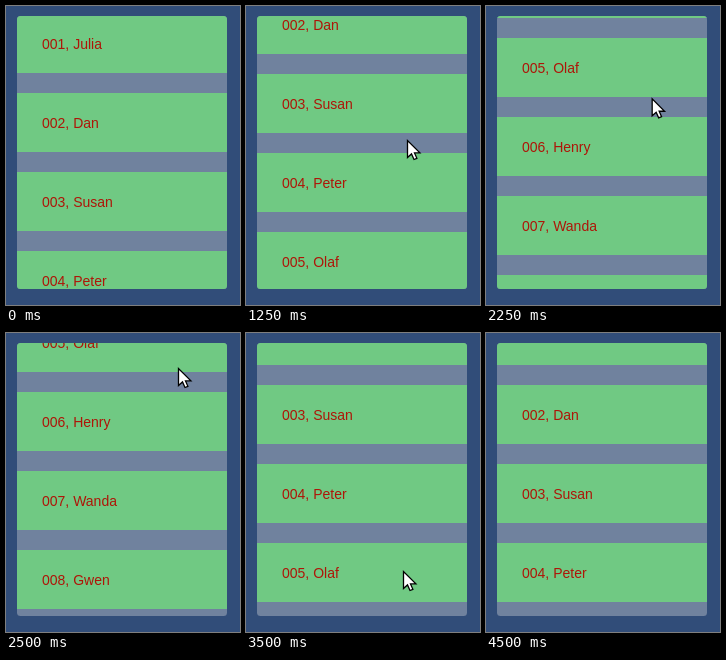
These frames come from a looping animation (234 px wide and 299 px high, 4.75 s). An HTML page with a canvas:

```html
<!DOCTYPE html>
<html lang="en">
<head>
<meta charset="utf-8">
<title>Scrolling list</title>
<style>
html, body { margin: 0; width: 100%; height: 100%; overflow: hidden; background: #314d79; }
canvas { display: block; width: 234px; height: 299px; }
</style>
</head>
<body>
<canvas id="stage" width="234" height="299"></canvas>
<script>
const ctx = document.getElementById('stage').getContext('2d');
const names = ['Julia', 'Dan', 'Susan', 'Peter', 'Olaf', 'Henry', 'Wanda', 'Gwen'];

const STEP = 250;
const LOOP = 4750;
const VIEW = { x: 11, y: 10, w: 210, h: 273 };
const ITEM = { top: 8, height: 59, pitch: 79 };

const linear = p => p;
const accelerate = p => p * p;
const coast = p => 1 - (1 - p) ** 3.5;

// Drag up twice, drag back down, then coast to rest.
const scrollPath = [
  { t: 750, y: 0 },
  { t: 1250, y: 98 },
  { t: 1750, y: 187 },
  { t: 2500, y: 344 },
  { t: 2750, y: 351 },
  { t: 3500, y: 114 },
  { t: 4500, y: 35, ease: coast }
];

const pointerPath = [
  { t: 250, x: 171, y: 232 },
  { t: 750, x: 168, y: 243 },
  { t: 1250, x: 161, y: 134 },
  { t: 1750, x: 153, y: 207 },
  { t: 2500, x: 172, y: 35 },
  { t: 3500, x: 157, y: 238, ease: accelerate },
  { t: 4000, x: 167, y: 205 }
];

function follow(path, time, axis) {
  const next = path.findIndex(point => point.t >= time);
  if (next <= 0) return path.at(next)[axis];
  const a = path[next - 1], b = path[next];
  const ease = b.ease ?? linear;
  return a[axis] + (b[axis] - a[axis]) * ease((time - a.t) / (b.t - a.t));
}

function drawList(scroll) {
  ctx.save();
  ctx.beginPath();
  ctx.roundRect(VIEW.x, VIEW.y, VIEW.w, VIEW.h, 3.5);
  ctx.clip();
  ctx.fillStyle = '#70829e';
  ctx.fillRect(VIEW.x, VIEW.y, VIEW.w, VIEW.h);
  ctx.font = '14px "Liberation Sans", Arial, sans-serif';
  names.forEach((name, i) => {
    const y = ITEM.top + i * ITEM.pitch - scroll;
    ctx.fillStyle = '#70c983';
    ctx.fillRect(VIEW.x, y, VIEW.w, ITEM.height);
    ctx.fillStyle = '#ae1508';
    ctx.fillText(`${String(i + 1).padStart(3, '0')}, ${name}`, 36, y + 35);
  });
  ctx.restore();
}

function drawPointer(x, y) {
  const outline = [[0, 0], [0, 17], [4, 13.4], [6.5, 19], [9.4, 17.8], [7, 12.4], [12.4, 12.4]];
  ctx.save();
  ctx.translate(x + 0.5, y + 0.5);
  ctx.beginPath();
  outline.forEach(([px, py]) => ctx.lineTo(px, py));
  ctx.closePath();
  ctx.fillStyle = '#fff';
  ctx.fill();
  ctx.strokeStyle = '#000';
  ctx.lineWidth = 1.3;
  ctx.stroke();
  ctx.restore();
}

function draw(now) {
  const time = Math.floor(now % LOOP / STEP) * STEP;
  ctx.fillStyle = '#314d79';
  ctx.fillRect(0, 0, 234, 299);
  drawList(Math.round(follow(scrollPath, time, 'y')));
  if (time >= pointerPath[0].t && time <= pointerPath.at(-1).t) {
    drawPointer(follow(pointerPath, time, 'x'), follow(pointerPath, time, 'y'));
  }
}

let start;
function tick(now) {
  start ??= now;
  draw(now - start);
  requestAnimationFrame(tick);
}
draw(0);
requestAnimationFrame(tick);
</script>
</body>
</html>
```
